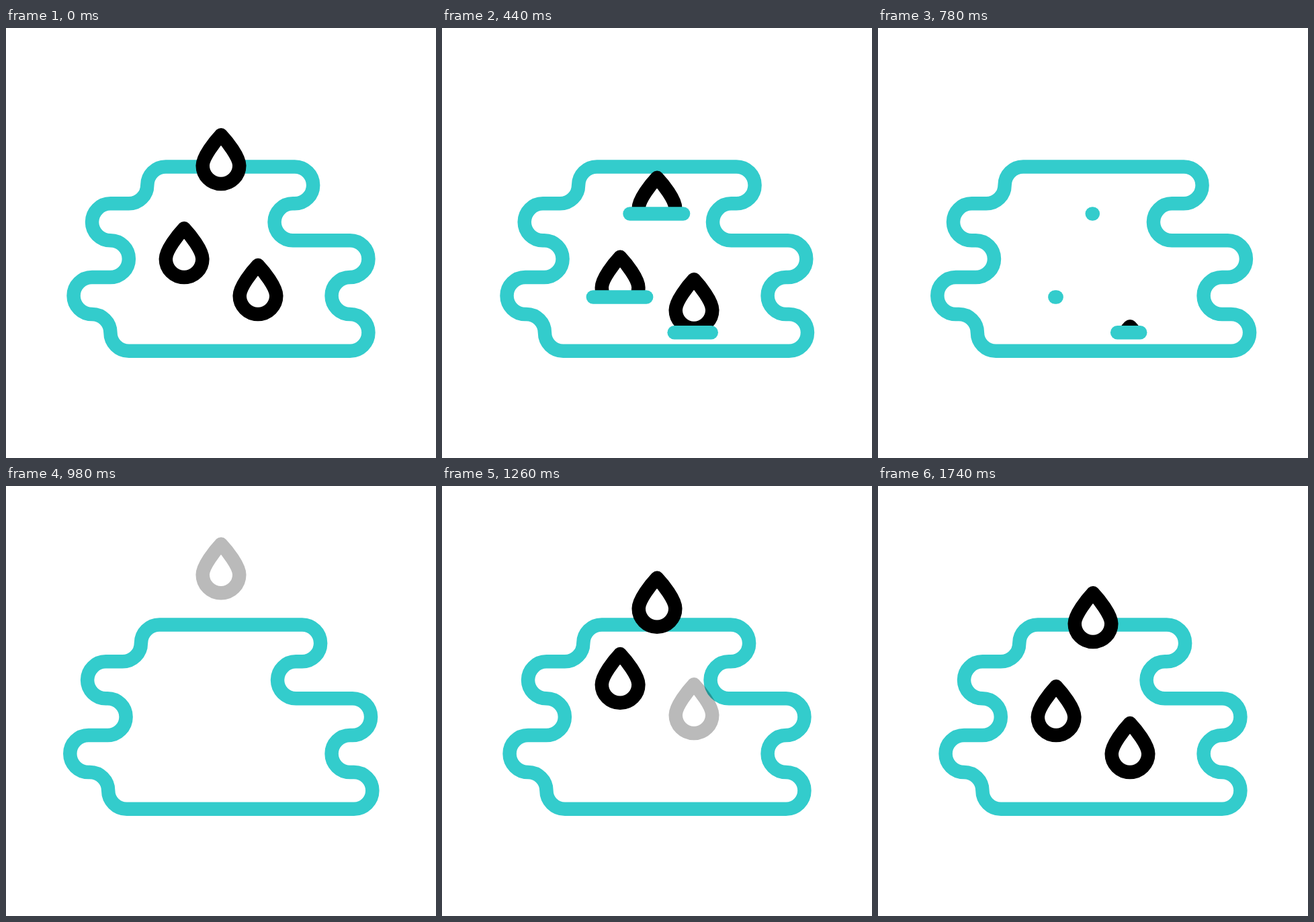
Recreate the animation shown at these times as an HTML page with a canvas. Size 640x640 px, loop 1940 ms.

```html
<!DOCTYPE html>
<html lang="en">
<head>
<meta charset="utf-8">
<title>Drops and puddle</title>
<style>
  html, body { margin: 0; width: 100%; height: 100%; overflow: hidden; background: #fff; }
  canvas { display: block; width: 640px; height: 640px; }
</style>
</head>
<body>
<canvas id="stage" width="640" height="640"></canvas>
<script>
const LOOP = 1940, STEP = 20, TEAL = '#33cccc';
const R = 27.43, LEFT = 128, TOP = 206.5;
const UP = -Math.PI / 2, DOWN = Math.PI / 2;
const RISE = 560, FADE = 235, BAR = 79.5, SHRINK = 365;
const ctx = document.getElementById('stage').getContext('2d');

const clamp = u => Math.min(1, Math.max(0, u));
const smooth = u => u * u * (3 - 2 * u);
const quad = u => u * u;
const ramp = (t, from, to, ease = smooth) => ease(clamp((t - from) / (to - from)));
const pulse = (t, from, peak, to) => ramp(t, from, peak) - ramp(t, peak, to);

// Half-circle lobes as [column in radii, sideways spread], bulging out and in by turns
const rightLobes = [[11, 27], [10.9, 11], [14, 9], [14, 0], [14, 14.5]];
const leftLobes = [[0, -13], [1, -10.5], [1, -17]];

// fall: start, end, distance; rise: start, height; bar: centre, start, peak
const drops = [
  { x: 320, y: 204.8, fall: [182, 742, 144], ease: smooth, rise: [900, 77], bar: [319.3, 276.4, 171, 440] },
  { x: 265.1, y: 343.7, fall: [201, 761, 109], ease: smooth, rise: [1020, 79.5], bar: [264.5, 400.6, 0, 452] },
  { x: 375, y: 398.6, fall: [125, 835, 107], ease: quad, rise: [1180, 61.3], bar: [373.2, 453.2, 200, 580] }
];

const dropShape = new Path2D(
  'M0-45.5C-9-36-27.3-13-27.3 0A27.3 27.3 0 0 0 27.3 0C27.3-13 9-36 0-45.5Z');

// Rigid arcs slide sideways; the path joins them with straight runs.
function drawPuddle(t) {
  const swell = pulse(t, 280, 710, 1190);
  const arc = (col, row, spread, from, to, ccw) =>
    ctx.arc(LEFT + col * R + spread * swell, TOP + (2 * row + 1) * R, R, from, to, ccw);
  ctx.beginPath();
  rightLobes.forEach(([col, spread], i) => arc(col, i, spread, UP, DOWN, i % 2 === 1));
  arc(2, 4, -8, DOWN, Math.PI, false);
  arc(0, 4, -8, 0, UP, true);
  leftLobes.forEach(([col, spread], i) => arc(col, 3 - i, spread, DOWN, UP, i % 2 === 1));
  arc(2, 0, -23, DOWN, 0, true);
  arc(4, 0, -23, Math.PI, -DOWN, false);
  ctx.closePath();
  ctx.strokeStyle = TEAL;
  ctx.stroke();
}

function drawDrop(t, { x, y, fall, ease, rise, bar }) {
  const [from, to, depth] = fall, [back, height] = rise;
  const falling = t < back;
  if (falling && t >= to) return;
  ctx.save();
  if (falling) {
    ctx.beginPath();
    ctx.rect(0, 0, 640, bar[1] - 8);
    ctx.clip();
    ctx.translate(x, y + depth * ramp(t, from, to, ease));
  } else {
    ctx.globalAlpha = ramp(t, back, back + FADE);
    ctx.translate(x, y - height * (1 - ramp(t, back, back + RISE)));
  }
  ctx.fillStyle = '#fff';
  ctx.strokeStyle = '#000';
  ctx.fill(dropShape);
  ctx.stroke(dropShape);
  ctx.restore();
}

function drawBar(t, [x, y, from, peak]) {
  const half = BAR * pulse(t, from, peak, peak + SHRINK) / 2;
  if (half <= 0) return;
  ctx.beginPath();
  ctx.moveTo(x - half, y);
  ctx.lineTo(x + half, y);
  ctx.strokeStyle = TEAL;
  ctx.stroke();
}

function draw(t) {
  ctx.fillStyle = '#fff';
  ctx.fillRect(0, 0, 640, 640);
  ctx.lineWidth = 20.5;
  ctx.lineCap = ctx.lineJoin = 'round';
  drawPuddle(t);
  drops.forEach(d => drawDrop(t, d));
  drops.forEach(d => drawBar(t, d.bar));
}

const start = performance.now();
function tick() {
  const t = (performance.now() - start) % LOOP;
  draw(Math.floor(t / STEP) * STEP);
  requestAnimationFrame(tick);
}
tick();
</script>
</body>
</html>
```
